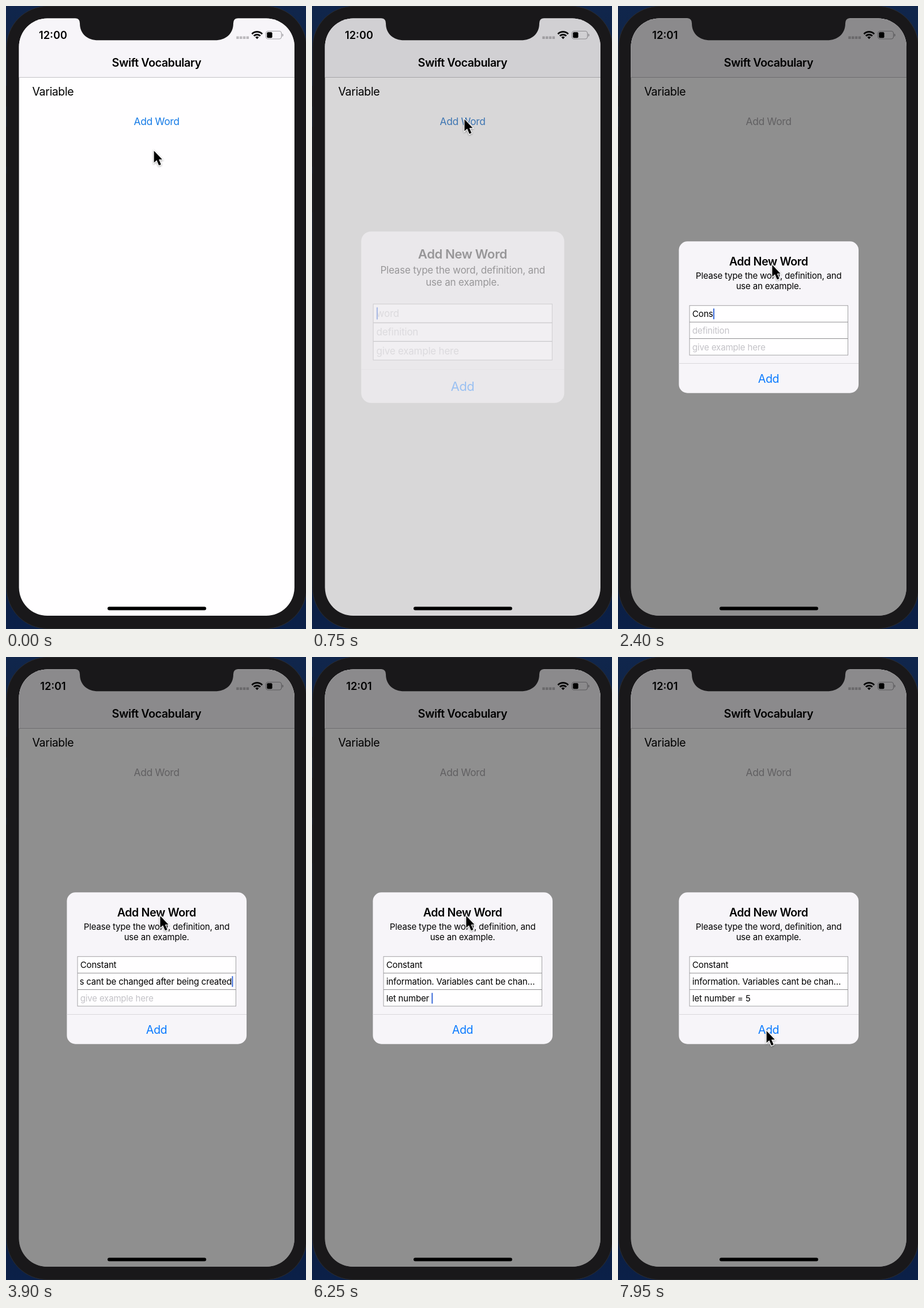
Write an HTML page that moves like this. It is 520 px wide and 1078 px high and loops after 8000 ms.

```html
<!DOCTYPE html>
<html lang="en">
<head>
<meta charset="utf-8">
<title>Swift Vocabulary</title>
<style>
  html, body { margin: 0; width: 100%; height: 100%; overflow: hidden; background: #0b1c3a; }
  svg { display: block; width: 100%; height: 100%; }
  text { font-family: Inter, Roboto, sans-serif; font-optical-sizing: none; fill: #000; }
  .mid { text-anchor: middle; }
  .body { font-size: 19.6px; letter-spacing: -0.4px; }
  .bold { font-weight: 600; }
  .small { font-size: 15px; letter-spacing: -0.17px; }
  .link { fill: #0a7aff; }
  #clock { font-size: 18.2px; }
  #button { font-size: 17.3px; letter-spacing: -0.28px; }
  .box { fill: #fffeff; stroke: #a3a2a5; }
  #cursor { filter: drop-shadow(0 1.5px 1.5px rgba(0, 0, 0, .35)); }
</style>
</head>
<body>
<svg viewBox="0 0 520 1078" preserveAspectRatio="none">
  <defs>
    <linearGradient id="desk" x2="0" y2="1">
      <stop offset="0" stop-color="#10264c"/>
      <stop offset=".5" stop-color="#0a1426"/>
      <stop offset="1" stop-color="#0b2048"/>
    </linearGradient>
    <clipPath id="screen"><rect x="22.5" y="21.5" width="477.5" height="1033.5" rx="49"/></clipPath>
    <clipPath id="inner"><rect x="128.5" y="518" width="265.5" height="87"/></clipPath>
  </defs>

  <rect width="520" height="1078" fill="url(#desk)"/>
  <path d="M0 138V174M0 209V278M0 290V357" stroke="#0c0c10" stroke-width="2"/>
  <rect x="1" y=".5" width="520" height="1077" rx="71" fill="#19181a" stroke="#2b2d32"/>

  <g clip-path="url(#screen)">
    <rect x="22" y="21" width="479" height="1035" fill="#fffeff"/>
    <rect x="22" y="21" width="479" height="102" fill="#f7f5f9"/>
    <path d="M22 123.5H501" stroke="#c3c2c5"/>
    <path d="M399.3 54.7H421" stroke="#bcbabe" stroke-width="4.4" stroke-dasharray="4.4 1.35"/>
    <rect x="450.5" y="43.5" width="27" height="13.5" rx="4" fill="none" stroke="#a5a4a8" stroke-width="1.2"/>
    <path d="M479.2 48a3 3 0 0 1 0 4.6z" fill="#a5a4a8" stroke="#a5a4a8" stroke-width=".8"/>
    <text id="button" class="mid" x="261" y="205.5">Add Word</text>
    <rect id="dim" x="22" y="21" width="479" height="1035" fill="#000"/>
    <text id="clock" class="mid bold" x="81.5" y="56.5"></text>
    <text class="mid body bold" x="261" y="104.5">Swift Vocabulary</text>
    <text class="body" x="45.5" y="154.5">Variable</text>
    <rect x="452.3" y="45.3" width="9.2" height="9.9" rx="2"/>
    <g fill="none" stroke="#000" stroke-width="2.8">
      <path d="M426.3 48.4a12.6 12.6 0 0 1 17.8 0M429.6 51.8a8 8 0 0 1 11.2 0"/>
    </g>
    <path d="M435.2 57.2l-3-3.1a4.3 4.3 0 0 1 6 0z"/>
    <rect x="176" y="1039.5" width="171" height="6" rx="3"/>
  </g>
  <path d="M120 21Q128 21.5 128 30C128 48 141 59.3 160 59.3H362C381 59.3 394 48 394 30Q394 21.5 402 21Z" fill="#19181a"/>

  <g id="alert">
    <rect id="card" x="105.5" y="407.3" width="311.5" height="262.4" rx="15" fill="#f7f5f9"/>
    <g id="content">
      <text class="mid body bold" x="261" y="448.8">Add New Word</text>
      <text class="mid small" x="261.2" y="472">Please type the word, definition, and</text>
      <text class="mid small" x="261" y="490.3">use an example.</text>
      <rect class="box" x="124" y="518.3" width="274.5" height="85.8"/>
      <path d="M124 547H398.5M124 575.5H398.5" stroke="#8e8d90" stroke-width="1.2"/>
      <g id="fields" clip-path="url(#inner)"></g>
      <path d="M105.5 618.5H417" stroke="#dad8dc"/>
      <text class="mid body link" x="261" y="651.5">Add</text>
    </g>
  </g>

  <path id="cursor" d="M0 0V20.5L4.7 16.3L8.5 25.3L12.2 23.7L8.4 15H14.3Z" stroke="#fff" stroke-width="2.4" paint-order="stroke"/>
</svg>

<script>
const LOOP = 8000, BLINK = 540, LEFT = 128.8, ROOM = 263.5;
const SHOW = { at: 660, length: 400 };
const $ = id => document.getElementById(id);
const clamp = u => Math.max(0, Math.min(1, u));
const mix = (a, b, u) => a + (b - a) * u;

// Cursor moves: start, end, from, to.
const moves = [
  [50, 450, [256.5, 250.5], [264.3, 196]],
  [1100, 1450, [264.3, 196], [267.3, 448]],
  [7640, 7930, [267.3, 448], [257.5, 647]]
];

// Each field gains one part of its text at each listed time.
const fields = [
  { hint: "word", focus: SHOW.at, parts: [..."Constant"],
    times: [1800, 2000, 2200, 2350, 2500, 2600, 2700, 2800] },
  { hint: "definition", focus: 3050,
    parts: ["information. Variables cant be changed after being created"],
    times: [3500], cut: "information. Variables cant be chan…" },
  { hint: "give example here", focus: 4400, parts: [..."let number = 5"],
    times: [4750, 4900, 5050, 5200, 5400, 5500, 5650, 5750, 5900, 6000, 6150, 6400, 6550, 6900] }
];

function make(tag, attrs) {
  const el = document.createElementNS("http://www.w3.org/2000/svg", tag);
  for (const key in attrs) el.setAttribute(key, attrs[key]);
  return $("fields").appendChild(el);
}

fields.forEach((field, i) => {
  field.el = make("text", { class: "small", y: 537.7 + 28.9 * i });
});
const caret = make("rect", { width: 2, height: 19, rx: 1, fill: "#3a6ad8" });

function drawFields(t) {
  const active = t >= fields[2].focus ? 2 : t >= fields[1].focus ? 1 : 0;
  fields.forEach((field, i) => {
    const count = field.times.filter(at => at <= t).length;
    const typed = field.parts.slice(0, count).join("");
    const shown = i < active && field.cut || typed || field.hint;
    field.el.textContent = shown.replace(/ /g, "\u00a0");
    field.el.style.fill = typed ? "#000" : "#c3c2c7";
    const width = typed ? field.el.getComputedTextLength() : 0;
    const scroll = i === active ? Math.max(0, width - ROOM + 1) : 0;
    field.el.setAttribute("x", LEFT - scroll);
    if (i !== active) return;
    const last = count ? field.times[count - 1] : field.focus;
    caret.setAttribute("x", LEFT + width - scroll + .2);
    caret.setAttribute("y", 523.2 + 28.9 * i);
    caret.setAttribute("opacity", Math.floor(Math.max(0, t - last) / BLINK) % 2 ? 0 : 1);
  });
}

function drawCursor(t) {
  const [start, end, from, to] = moves.filter(m => t >= m[0]).pop() || moves[0];
  const u = clamp((t - start) / (end - start));
  const s = u * u * (3 - 2 * u);
  const [x, y] = from.map((v, i) => mix(v, to[i], s));
  $("cursor").setAttribute("transform", `translate(${x} ${y})`);
}

function draw(t) {
  const p = Math.sin(clamp((t - SHOW.at) / SHOW.length) * Math.PI / 2);
  const scale = mix(1.2, 1, p);
  $("dim").setAttribute("opacity", .44 * p);
  $("card").setAttribute("opacity", Math.sqrt(p));
  $("content").setAttribute("opacity", p);
  $("alert").setAttribute("transform",
    `translate(261.3 538.4) scale(${scale}) translate(-261.3 -538.4)`);
  const tint = [[20, 122, 230], [170, 169, 172]];
  $("button").style.fill = `rgb(${tint[0].map((c, i) => Math.round(mix(c, tint[1][i], p)))})`;
  $("clock").textContent = t < 1750 ? "12:00" : "12:01";
  drawFields(t);
  drawCursor(t);
}

const began = performance.now();
function tick() {
  draw((performance.now() - began) % LOOP);
  requestAnimationFrame(tick);
}
tick();
</script>
</body>
</html>
```
